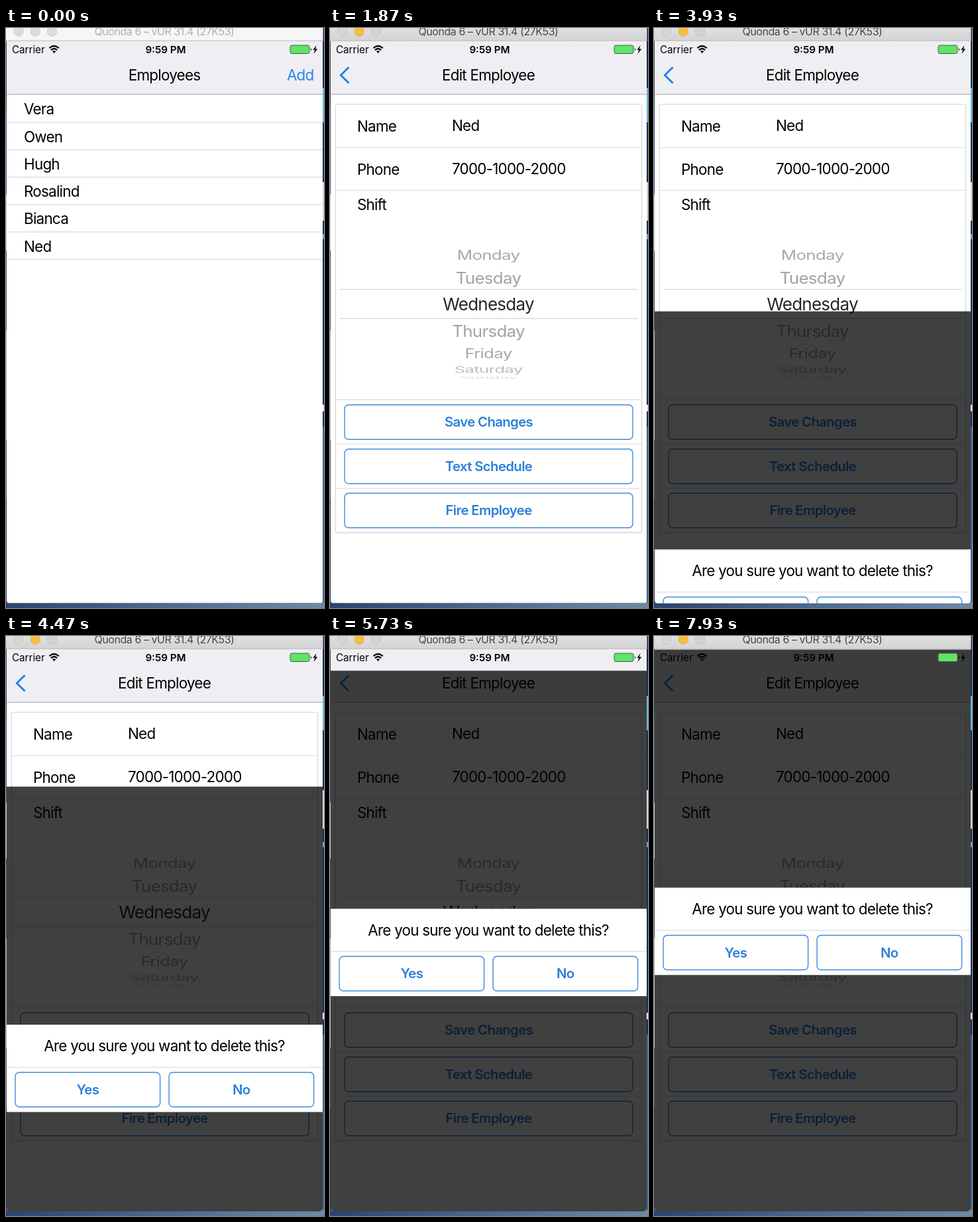
An HTML page that plays this animation: 480 by 873 pixels, repeating every 8 s.

```html
<!DOCTYPE html>
<html lang="en">
<head>
<meta charset="utf-8">
<title>Employee list</title>
<style>
  html, body { margin: 0; width: 100%; height: 100%; overflow: hidden; background: #fff; }
  svg { display: block; width: 480px; height: 873px; }
  text { font: 22.4px Inter, Roboto, sans-serif; letter-spacing: -.75px; white-space: pre; }
  .mid { text-anchor: middle; }
  .bar { font-size: 16px; letter-spacing: -.45px; }
  .status { font-size: 15.2px; letter-spacing: 0; }
  .button { font-size: 20.3px; font-weight: 600; letter-spacing: -.6px; fill: #2b7fd9; }
  .day { font-size: 26px; }
  .blue { fill: #2385ee; }
</style>
</head>
<body>
<svg id="stage" viewBox="0 0 480 873"></svg>
<script>
const LOOP = 8000, STEP = 1000 / 15;
const FOCUS_AT = 66;
const PUSH = { start: 800, length: 500 };
const MODAL = { start: 2988, rate: 1.84, top: 19.5, height: 846 };

const rect = (x, y, w, h, fill, extra = '') =>
  `<rect x="${x}" y="${y}" width="${w}" height="${h}" fill="${fill}" ${extra}/>`;
const text = (x, y, label, cls = '', extra = '') =>
  `<text x="${x}" y="${y}" class="${cls}" ${extra}>${label}</text>`;
const line = (x1, x2, y, color) => rect(x1, y - .6, x2 - x1, 1.2, color);
const button = (x, y, w, label) =>
  rect(x, y, w, 52, '#fff', 'rx="6" stroke="#3f8bdb" stroke-width="1.4"') +
  text(x + w / 2, y + 33.2, label, 'mid button');

// Desktop slivers around the window: [x, y, height, color]
const desktop = rect(0, 0, 480, 873, '#16305f') + [
  [0, 0, 120, '#3a4560'], [0, 120, 130, '#4a5590'], [0, 250, 85, '#c9ccd4'],
  [0, 335, 120, '#55585f'], [0, 455, 165, '#b4b6ba'], [0, 620, 90, '#55585f'],
  [0, 710, 156, '#303644'],
  [477, 90, 52, '#5fbfe0'], [477, 232, 58, '#d9d9dc'], [477, 310, 8, '#8394b5'],
  [477, 567, 10, '#e2e8f0'], [477, 600, 266, '#3d639c']
].map(([x, y, h, c]) => rect(x, y, 3, h, c)).join('') +
  rect(0, 864, 480, 9, 'url(#ground)');

const names = ['Vera', 'Owen', 'Hugh', 'Rosalind', 'Bianca', 'Ned'];
const list = rect(1, 100, 477, 766, '#fff') + names.map((name, i) =>
  text(27, 130.3 + i * 41.25, name) + line(1, 478, 142 + i * 41.25, '#d8d8da')).join('');

// Picker rows: label, centre, vertical squash, colour
const days = [
  ['Monday', 342, .75, '#a9a9a9'], ['Tuesday', 376, .91, '#a2a2a2'],
  ['Wednesday', 416, 1, '#262626'], ['Thursday', 456, .91, '#a2a2a2'],
  ['Friday', 490, .75, '#a9a9a9'], ['Saturday', 514, .5, '#bcbcbc'],
  ['Sunday', 526, .2, '#dcdcdc']
].map(([label, y, squash, color]) =>
  text(0, 9.4, label, 'mid day', `fill="${color}" transform="translate(239 ${y}) scale(1 ${squash})"`)).join('');

const form = rect(1, 100, 477, 766, '#fff') +
  rect(7.5, 115, 464, 646, '#000', 'opacity=".07" rx="2"') +
  rect(8.5, 114.8, 462, 644.4, '#fff', 'stroke="#d9d9d9" stroke-width="1.2" rx="1.5"') +
  [180, 244.3, 559.5, 626.3, 693].map(y => line(9, 470, y, '#dcdcde')).join('') +
  text(41, 156, 'Name') + text(184, 155, 'Ned') +
  text(41, 221, 'Phone') + text(184, 220, '7000-1000-2000') +
  text(41, 273.5, 'Shift') +
  line(15, 464, 393.5, '#d2d2d4') + line(15, 464, 437.3, '#d2d2d4') + days +
  button(22, 567.2, 435, 'Save Changes') +
  button(22, 633.8, 435, 'Text Schedule') +
  button(22, 700.2, 435, 'Fire Employee');

const modal = rect(1, 0, 477, MODAL.height, '#000', 'opacity=".75"') +
  rect(1, 358.3, 477, 131.5, '#fff') +
  text(239, 398.3, 'Are you sure you want to delete this?', 'mid') +
  line(1, 478, 422.5, '#dcdcde') +
  button(14, 430, 218.6, 'Yes') + button(246, 430, 218.6, 'No');

const status = text(9, 37.5, 'Carrier', 'status') +
  `<g fill="none" stroke="#000" stroke-width="2.2">
     <path d="M65.4 30.2Q72.6 23.8 79.8 30.2M68 33.1Q72.6 29 77.2 33.1"/></g>
   <path d="M70 35.2Q72.6 32.8 75.2 35.2L72.6 38z"/>` +
  text(241, 37.5, '9:59 PM', 'mid status', 'style="font-weight:600"') +
  rect(429, 26, 29, 12.5, '#5fe467', 'rx="2.5" stroke="#4a5a4a" stroke-width="1"') +
  '<path d="M460 30.2q2.2 2 0 4zM468.5 26l-5.2 7h3l-2 6 6-7.5h-3.3z"/>';

const titleBar = (id, bg, ink, lights) => `<g id="${id}">` +
  rect(0, 0, 478.5, 19.5, bg) + line(0, 478.5, 19.2, '#c4c4c6') +
  lights.map((c, i) =>
    `<circle cx="${19 + i * 25.2}" cy="5" r="7.4" fill="${c}" stroke="#000" stroke-opacity=".1"/>`).join('') +
  text(239, 11, 'Quonda 6 – vUR 31.4 (27K53)', 'mid bar', `fill="${ink}"`) + '</g>';

const stage = document.getElementById('stage');
stage.innerHTML = `
  <defs>
    <linearGradient id="ground">
      <stop offset="0" stop-color="#2b4470"/><stop offset=".5" stop-color="#4b6a92"/>
      <stop offset="1" stop-color="#6d8aa6"/>
    </linearGradient>
    <linearGradient id="chrome" x2="0" y2="1">
      <stop offset="0" stop-color="#e0e0e0"/><stop offset="1" stop-color="#d3d3d3"/>
    </linearGradient>
    <clipPath id="screen"><path d="M1 19.5H478V861q0 5-5 5H6q-5 0-5-5z"/></clipPath>
  </defs>
  ${desktop}
  <g clip-path="url(#screen)">
    ${rect(1, 19, 477, 847, '#fff')}
    <g id="list">${list}</g>
    <g id="form">${form}</g>
    ${rect(1, 19, 477, 81, '#efeff3')}${line(1, 478, 99.8, '#b4b4b8')}
    <g id="listTitle">${text(239, 79.3, 'Employees', 'mid')}</g>
    <g id="add">${text(464.5, 78.6, 'Add', 'blue', 'text-anchor="end"')}</g>
    <g id="formTitle">${text(239, 79.3, 'Edit Employee', 'mid')}</g>
    <path id="back" d="M28.5 59L16.3 71L28.5 83" fill="none" stroke="#2182ea" stroke-width="3"/>
    <g id="modal">${modal}</g>
    ${status}
  </g>
  ${titleBar('idle', '#f6f6f6', '#b0b0b0', ['#dcdcdc', '#dcdcdc', '#dcdcdc'])}
  ${titleBar('active', 'url(#chrome)', '#484848', ['#d6d6d6', '#fbbd3f', '#d2d2d2'])}`;

const part = Object.fromEntries([...stage.querySelectorAll('[id]')].map(el => [el.id, el]));
const place = (el, transform, opacity = 1) => {
  el.setAttribute('transform', transform);
  el.setAttribute('opacity', opacity);
};
const clamp = v => v < 0 ? 0 : v > 1 ? 1 : v;
const easeInOut = p => (1 - Math.cos(Math.PI * p)) / 2;

function render(ms) {
  const t = Math.floor((ms + 4) / STEP) * STEP;

  const focused = t >= FOCUS_AT;
  part.idle.setAttribute('visibility', focused ? 'hidden' : 'visible');
  part.active.setAttribute('visibility', focused ? 'visible' : 'hidden');

  const p = easeInOut(clamp((t - PUSH.start) / PUSH.length));
  const scale = 1 - .05 * p;
  place(part.list, `translate(${239 - 10 * p} 483) scale(${scale}) translate(-239 -483)`, 1 - .7 * p);
  place(part.form, `translate(${477 * (1 - p)} 0)`);
  place(part.listTitle, `translate(${-200 * p} 0)`, 1 - p);
  place(part.formTitle, `translate(${200 * (1 - p)} 0)`, p);
  place(part.add, '', 1 - p);
  place(part.back, '', p);

  // Critically damped spring
  const x = t > MODAL.start ? MODAL.rate * (t - MODAL.start) / 1000 : 0;
  const left = (1 + x) * Math.exp(-x);
  place(part.modal, `translate(0 ${MODAL.top + MODAL.height * left})`);
}

const begin = performance.now();
function tick() {
  render((performance.now() - begin) % LOOP);
  requestAnimationFrame(tick);
}
render(0);
requestAnimationFrame(tick);
</script>
</body>
</html>
```
